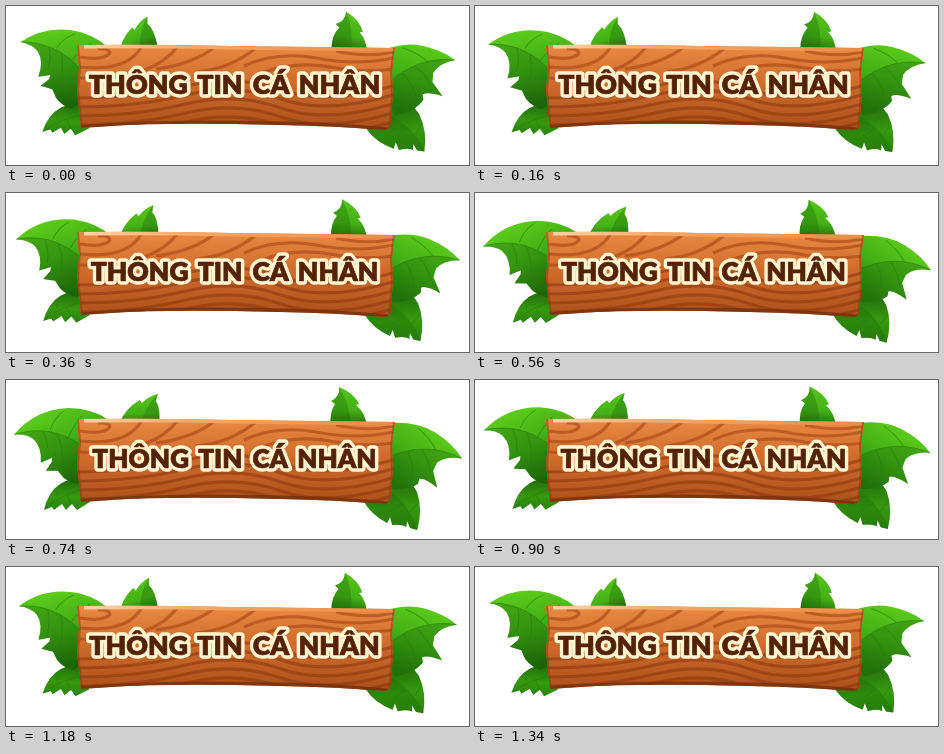
Write an HTML page that moves like this. It is 463 px wide and 159 px high and loops after 1360 ms.

```html
<!DOCTYPE html>
<html lang="vi">
<head>
<meta charset="utf-8">
<style>
html, body { margin: 0; width: 100%; height: 100%; overflow: hidden; background: #fff; }
svg { display: block; width: 100vw; height: 100vh; }
text { font: 900 26.8px Lato, "Open Sans", sans-serif; text-anchor: middle; word-spacing: 4px; stroke-linejoin: round; }
.vein { fill: none; stroke: #2a7d0b; stroke-width: 1; opacity: .6; }
.shade { fill: #1d6a08; opacity: .35; }
</style>
</head>
<body>
<svg viewBox="0 0 463 159">
  <defs>
    <linearGradient id="wood" x2="0" y2="1">
      <stop offset="0" stop-color="#ea8a43"/>
      <stop offset=".45" stop-color="#cf6c2c"/>
      <stop offset="1" stop-color="#ac4f1b"/>
    </linearGradient>
    <linearGradient id="lip" x2="1">
      <stop offset="0" stop-color="#fbd3a6"/>
      <stop offset=".35" stop-color="#f5a866"/>
      <stop offset="1" stop-color="#e98d48"/>
    </linearGradient>
    <linearGradient id="left" gradientUnits="userSpaceOnUse" x1="40" y1="30" x2="76" y2="98">
      <stop offset="0" stop-color="#5dcd1a"/>
      <stop offset=".5" stop-color="#41ab16"/>
      <stop offset="1" stop-color="#1c6209"/>
    </linearGradient>
    <linearGradient id="right" gradientUnits="userSpaceOnUse" x1="430" y1="48" x2="390" y2="105">
      <stop offset="0" stop-color="#5dcd1a"/>
      <stop offset=".5" stop-color="#43ae16"/>
      <stop offset="1" stop-color="#24740c"/>
    </linearGradient>
    <linearGradient id="under" x2="0" y2="1">
      <stop offset="0" stop-color="#1c6509"/>
      <stop offset=".6" stop-color="#37990f"/>
      <stop offset="1" stop-color="#2a820c"/>
    </linearGradient>
    <linearGradient id="over" x2="0" y2="1">
      <stop offset="0" stop-color="#56c51a"/>
      <stop offset=".6" stop-color="#44b016"/>
      <stop offset="1" stop-color="#1e6a09"/>
    </linearGradient>
    <clipPath id="edge"><use href="#plank"/></clipPath>
  </defs>

  <!-- data-turn: resting angle, pivot x, pivot y -->
  <g data-turn="-17 135 48">
    <path fill="url(#over)" d="M112 46Q119 28 134 20L136 23Q143 16 152 14L150 21Q155 28 153 46Z"/>
    <path class="shade" d="M152 14L150 21Q155 28 153 46L134 46Q139 26 152 14Z"/>
  </g>
  <g data-turn="10 345 47">
    <path fill="url(#over)" d="M325 46Q323 33 329 24L325 21Q334 17 333 7Q348 13 353 24L350 25Q359 32 361 46Z"/>
    <path class="shade" d="M333 7Q334 17 325 21L329 24Q323 33 325 46L345 46Q344 24 333 7Z"/>
  </g>
  <g data-turn="6 78 112">
    <path fill="url(#under)" d="M38 130Q42 112 54 104Q66 97 78 97L84 122L71 130L66 124L60 130L56 124L48 130L46 127Z"/>
    <path class="vein" d="M39 129Q56 114 80 108M52 118L50 108M60 114L66 124"/>
  </g>
  <g data-turn="-8 382 95">
    <path fill="url(#under)" d="M357 120Q364 134 381 143L384 137L386 145Q396 144 400 147L401 141L404 148L411 150Q417 130 411 112Q405 100 392 95L370 100Z"/>
    <path class="shade" d="M357 120Q364 134 381 143L384 137L386 145Q396 144 400 147L401 141L404 148L411 150Q402 124 382 110Z"/>
    <path class="vein" d="M411 149Q402 124 382 110M404 132L413 122M398 124L384 131"/>
  </g>
  <g data-turn="17 75 68">
    <path fill="url(#left)" d="M8 55Q28 30 62 28Q86 28 103 40L100 80L76 104Q66 104 58 98L52 91L40 91L46 82L46 78L35 83Q36 67 27 59Q20 54 8 55Z"/>
    <path class="shade" d="M8 55Q48 42 84 72L76 104Q66 104 58 98L52 91L40 91L46 82L46 78L35 83Q36 67 27 59Q20 54 8 55Z"/>
    <path class="vein" d="M8 55Q48 42 84 72M36 51Q42 60 42 74M50 53Q58 68 57 86M44 50Q48 38 58 31M62 58Q68 44 76 36"/>
  </g>
  <g data-turn="-22 388 85">
    <path fill="url(#right)" d="M380 43Q412 41 430 53Q448 65 456 79Q440 76 431 83L427 91L431 108Q419 98 413 99L412 104Q400 112 380 108Z"/>
    <path class="shade" d="M456 79Q440 76 431 83L427 91L431 108Q419 98 413 99L412 104Q400 112 380 108L380 78Q420 60 456 79Z"/>
    <path class="vein" d="M456 79Q420 60 380 78M430 70Q424 58 412 48M416 69Q424 82 424 94M402 71Q408 84 406 100"/>
  </g>

  <path id="plank" fill="url(#wood)" d="M71 39Q150 38 225 40Q310 41 389 42L386 65L387 90L384 122L379 124Q330 120 275 119Q160 116 105 120L75 122L73 104L71 84L73 62Z"/>
  <g clip-path="url(#edge)" fill="none">
    <g stroke="#a64817" stroke-width="3.2" opacity=".62">
      <path d="M74 51Q98 55 104 47Q103 42 92 43M74 61Q122 66 136 40M74 72Q146 75 172 40M150 63Q188 58 210 40"/>
      <path d="M190 66Q225 63 251 41M238 60Q270 45 310 52Q350 60 387 52M258 66Q292 54 330 62Q360 67 388 63M330 45Q360 52 388 46"/>
    </g>
    <g id="grain" stroke="#8e390f" stroke-width="3.2" opacity=".6"></g>
    <path stroke="url(#lip)" stroke-width="5" d="M78 40Q150 39 225 41Q310 42 388 43"/>
    <path stroke="#75300d" stroke-width="7" opacity=".8" d="M73 123Q160 116 275 119Q330 120 382 125"/>
    <path stroke="#87400f" stroke-width="4" opacity=".55" d="M389 42L386 65L387 90L384 122M71 39L73 62L71 84L73 104L75 122"/>
  </g>

  <g id="title">
    <text x="228.5" y="88" fill="#fff5d2" stroke="#fff5d2" stroke-width="7.5">THÔNG TIN CÁ NHÂN</text>
    <text x="228.5" y="88" fill="#552207" stroke="#552207" stroke-width=".7">THÔNG TIN CÁ NHÂN</text>
  </g>
</svg>
<script>
const LOOP = 1360;
const title = document.getElementById("title");
const leaves = [...document.querySelectorAll("[data-turn]")].map(node => {
  const [angle, x, y] = node.dataset.turn.split(" ").map(Number);
  return { node, angle, x, y };
});

// Grain in the lower half sweeps up to the right, then levels off.
function grainLine(i) {
  const y = 84 + i * 9;
  return `<path d="M72 ${y + 8}Q130 ${y + 8} 180 ${y - 4}T275 ${y}T390 ${y - 5}"/>`;
}
document.getElementById("grain").innerHTML = [0, 1, 2, 3, 4].map(grainLine).join("");

function draw(ms) {
  const p = (1 - Math.cos(2 * Math.PI * ms / LOOP)) / 2;
  for (const { node, angle, x, y } of leaves)
    node.setAttribute("transform", `rotate(${angle * (1 - p)} ${x} ${y})`);
  title.setAttribute("transform", `translate(228.5 78) scale(${1 - 0.025 * p}) translate(-228.5 -78)`);
}

const start = performance.now();
function tick() {
  draw((performance.now() - start) % LOOP);
  requestAnimationFrame(tick);
}
draw(0);
requestAnimationFrame(tick);
</script>
</body>
</html>
```
